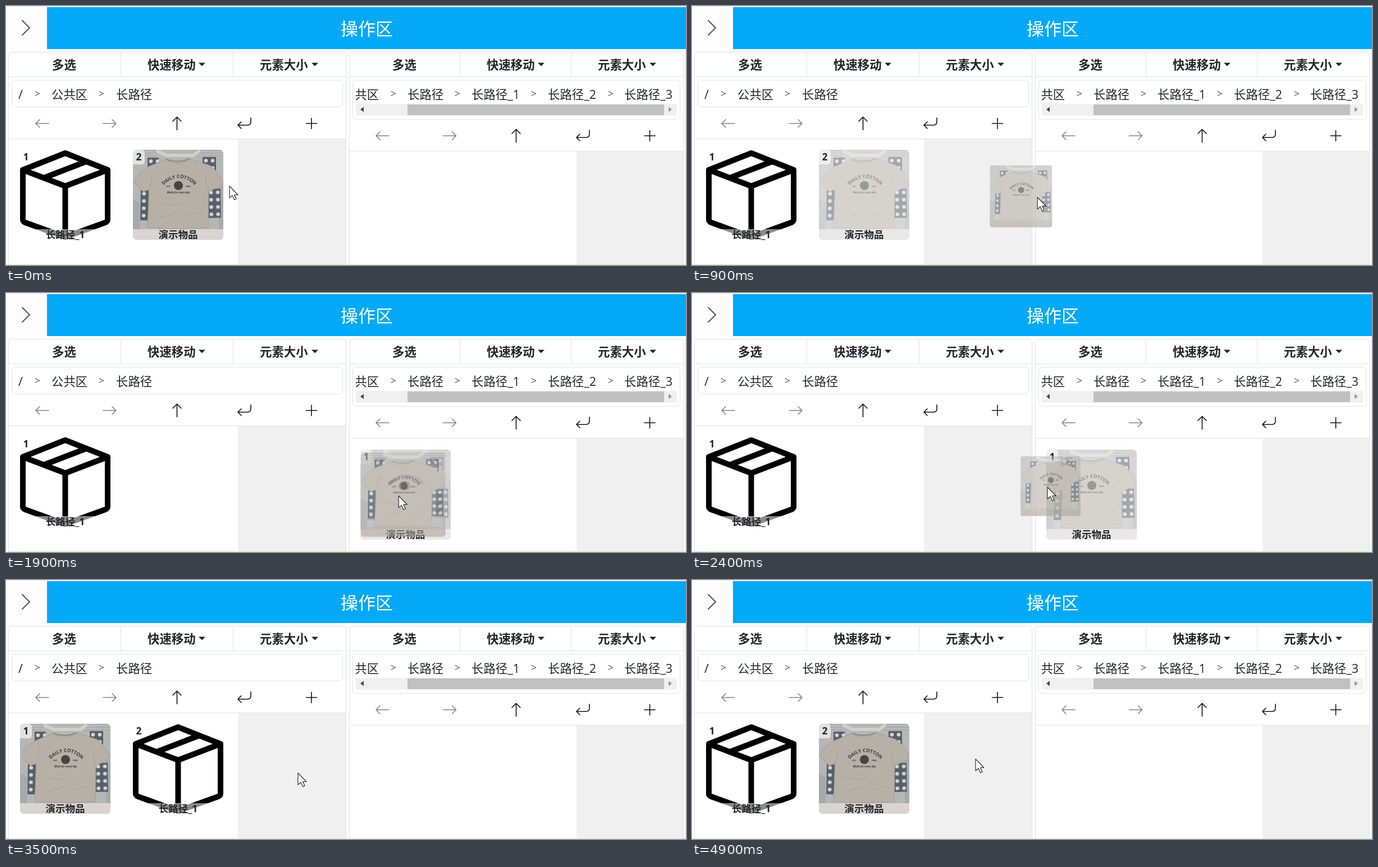
Animation, 1211 px wide and 463 px high, one loop 5000 ms. Source, as an HTML page:

```html
<!DOCTYPE html>
<html lang="zh-CN">
<head>
<meta charset="utf-8">
<title>操作区</title>
<style>
  html, body { margin: 0; width: 100%; height: 100%; overflow: hidden; background: #fdfdfd; }
  svg { display: block; width: 100%; height: 100%; }
  text { font-family: "Open Sans", "Noto Sans CJK SC", "Noto Sans CJK", sans-serif; fill: #212529; font-size: 21.4px; }
  .bold { font-weight: 700; }
  .mid { text-anchor: middle; }
  .small { font-size: 17.5px; }
  .line { fill: none; stroke: #dee2e6; }
  .icon { fill: none; stroke: #111; stroke-width: 1.6; stroke-linecap: round; stroke-linejoin: round; }
  .dim { stroke: #858585; }
  .print { fill: #3b3a3c; font-weight: 700; }
</style>
</head>
<body>
<svg viewBox="0 0 1211 463" preserveAspectRatio="none">
  <defs>
    <clipPath id="tile"><rect width="161" height="161" rx="7"/></clipPath>
    <clipPath id="crumbs"><rect x="622" y="134" width="573" height="40"/></clipPath>
    <filter id="blur" x="-20%" y="-20%" width="140%" height="140%"><feGaussianBlur stdDeviation="4"/></filter>
    <linearGradient id="glowFill">
      <stop offset=".4" stop-color="#6cd0fb"/><stop offset="1" stop-color="#6cd0fb" stop-opacity="0"/>
    </linearGradient>
    <pattern id="holes" width="12" height="13" patternUnits="userSpaceOnUse">
      <rect width="12" height="13" fill="#56606b"/><circle cx="6" cy="6.5" r="3.3" fill="#d4d6d5"/>
    </pattern>
    <pattern id="weave" width="8" height="5" patternUnits="userSpaceOnUse">
      <rect width="8" height="5" fill="#b9bab6"/><path d="M0 1H8" stroke="#999f9f"/>
    </pattern>
    <path id="arc" d="M54 64Q81 37 111 64"/>
    <g id="shirt" clip-path="url(#tile)">
      <rect width="161" height="161" fill="#b5b7b5"/>
      <path d="M0 0H42V24H0ZM110 0H161V12H110Z" fill="url(#weave)"/>
      <path d="M42 2L60 10H108L119 1" fill="none" stroke="#d0cfc9" stroke-width="6"/>
      <path d="M0 88L12 95V150H0ZM153 65H161V161H153Z" fill="#a5aaac"/>
      <rect width="20" height="24" transform="translate(26 14)" fill="url(#holes)"/>
      <rect width="24" height="26" transform="translate(124 13)" fill="url(#holes)"/>
      <rect width="14" height="54" transform="translate(14 72) rotate(1)" fill="url(#holes)"/>
      <rect width="23" height="52" transform="translate(133 70) rotate(-1)" fill="url(#holes)"/>
      <path d="M0 142H161V161H0Z" fill="#aaa397"/>
      <path d="M59 17Q80 24 101 16L137 28Q155 41 161 62L135 75L134 139Q82 144 26 139L29 71L18 75L2 57Q10 39 28 30Z" fill="#b6b0a6" stroke="#a19b91"/>
      <path d="M59 17Q80 33 101 16M30 69Q35 55 34 43M134 72Q129 58 130 46M40 92Q65 104 88 96M49 121L79 112M96 119L123 110" fill="none" stroke="#a49e94"/>
      <path d="M59 17Q80 25 101 16" fill="none" stroke="#8f8b84" stroke-width="2"/>
      <text class="print" style="font-size:8.6px"><textPath href="#arc" startOffset="50%" text-anchor="middle">DAILY COTTON</textPath></text>
      <circle cx="81" cy="64" r="8" fill="#454446"/>
      <text class="print mid" x="63" y="67" style="font-size:4px">EST</text>
      <text class="print mid" x="98" y="67" style="font-size:4px">1990</text>
      <text class="print mid" x="81" y="78" style="font-size:4.5px;font-style:italic">Made for every day</text>
    </g>
    <g id="box" fill="none" stroke="#000" stroke-width="10" stroke-linejoin="round">
      <path d="M80.5 6L156 36V125Q156 128 152 130L80.5 156L9 130Q5 128 5 125V36Z"/>
      <path d="M5 36L80.5 65L156 36M80.5 65V156M118 21L43 50"/>
    </g>
  </defs>

  <rect width="1211" height="463" fill="#fdfdfd"/>
  <path d="M0 .5H1211" stroke="#e4e4e4"/>
  <rect x="73" y="2" width="1138" height="75" fill="#03a9f6"/>
  <path d="M29 26L42 39L29 52" class="icon" style="stroke:#555;stroke-width:2"/>
  <text class="mid" x="642.5" y="52" style="font-size:31px;fill:#fff">操作区</text>
  <g id="ui"></g>
  <rect id="glow" x="-5" y="-4" width="171" height="169" rx="9" fill="url(#glowFill)" filter="url(#blur)"/>
  <g id="items"></g>
  <use id="ghost" href="#shirt" opacity=".58"/>
  <path d="M0 462.5H1211M1210.5 78V463" stroke="#c3f3b4"/>
  <path id="cursor" d="M0 0V21L5 16.7L8.8 24.5L12 23L8.5 15.5H15Z" fill="#fff" stroke="#222" stroke-width="1.1" stroke-linejoin="round"/>
</svg>
<script>
const $ = id => document.getElementById(id);
const text = (x, y, s, cls = '', style = '') => `<text x="${x}" y="${y}" class="${cls}" style="${style}">${s}</text>`;
const path = (d, cls = 'line') => `<path d="${d}" class="${cls}"/>`;

const icons = [
  ['M11.5 0H-11.5M-4.5 -7L-11.5 0L-4.5 7', 'icon dim'],
  ['M-11.5 0H11.5M4.5 -7L11.5 0L4.5 7', 'icon dim'],
  ['M0 11.5V-11.5M-7.5 -4L0 -11.5L7.5 -4', 'icon'],
  ['M11.5 -10V-3Q11.5 3 5.5 3H-11.5M-5.5 -3L-11.5 3L-5.5 9', 'icon'],
  ['M-9.5 0H9.5M0 -9.5V9.5', 'icon']
];

function panel({ x, right, tabs, labels, crumbBottom, toolY, toolXs, gridY, gray }) {
  const caret = cx => `<path d="M${cx - 6} 101.5h12l-6 6z" fill="#212529"/>`;
  return `<path d="M${x + .5} 463V88.5q0 -6 6 -6H${right - 6.5}q6 0 6 6V463" fill="#fff" stroke="#dee2e6"/>`
    + `<path d="M${gray} ${gridY + 1}H${right - 1}V463H${gray}z" fill="#f0f0f0"/>`
    + path(`M${x} 126.5H${right}M${x} ${gridY + .5}H${right}` + tabs.map(t => `M${t}.5 83V126`).join(''))
    + `<rect x="${x + 6.5}" y="132.5" width="${right - x - 13}" height="${crumbBottom - 132}" rx="6" class="line"/>`
    + text(labels[0], 113, '多选', 'bold') + text(labels[1], 113, '快速移动', 'bold') + text(labels[2], 113, '元素大小', 'bold')
    + caret(labels[1] + 97) + caret(labels[2] + 98)
    + icons.map(([d, cls], i) => `<g transform="translate(${toolXs[i]} ${toolY})">${path(d, cls)}</g>`).join('');
}

const crumb = ([x, s]) => s === '>'
  ? text(x, 163, '&gt;', 'mid', 'font-size:18px;fill:#555')
  : text(x, 166, s);

$('ui').innerHTML =
  panel({ x: 4, right: 606, tabs: [204, 404], labels: [82, 252, 452], crumbBottom: 180,
    toolY: 210, toolXs: [64.5, 184.5, 304.5, 424.5, 544], gridY: 237, gray: 413 })
  + panel({ x: 611, right: 1207, tabs: [808, 1006], labels: [688, 856, 1054], crumbBottom: 202,
    toolY: 232, toolXs: [670.5, 790, 908.5, 1027.5, 1146.5], gridY: 259, gray: 1016 })
  + [[22, '/'], [56, '>'], [81, '公共区'], [170, '>'], [196, '长路径']].map(crumb).join('')
  + '<g clip-path="url(#crumbs)">'
  + [[600, '公共区'], [690, '>'], [715, '长路径'], [804, '>'], [829, '长路径_1'], [940, '>'],
     [965, '长路径_2'], [1077, '>'], [1101, '长路径_3']].map(crumb).join('') + '</g>'
  + '<path d="M623 175H1195V196H623Z" fill="#f0f0f0"/><path d="M715 176H1172V195H715Z" fill="#c0c0c0"/>'
  + '<path d="M637 180.5v9l-6 -4.5z" fill="#444"/><path d="M1180 180.5v9l6 -4.5z" fill="#999"/>';

const item = (kind, label) => `<g id="${kind}Item"><use id="${kind}Image" href="#${kind}"/>
  <path d="M0 142H161V154q0 7 -7 7H7q-7 0 -7 -7z" fill="#fff" opacity=".55"/>
  <path d="M7 0H15q6 0 6 6V20q0 6 -6 6H0V7q0 -7 7 -7z" fill="#fff" opacity=".62"/>
  ${text(10.5, 19.3, '', 'bold mid small')}${text(80.5, 158, label, 'bold mid small')}</g>`;
$('items').innerHTML = item('box', '长路径_1') + item('shirt', '演示物品');

const left1 = [25, 257], left2 = [226, 257], right1 = [631, 280];

// Pointer path: time, x, y
const track = [
  [0, 398, 322], [300, 349, 340], [400, 360, 341], [600, 470, 330], [1100, 712, 350], [1300, 800, 338],
  [1500, 812, 345], [1800, 704, 364], [2100, 690, 360], [2400, 633, 347], [2800, 130, 348], [2900, 400, 350],
  [3000, 400, 350], [3100, 498, 348], [3500, 520, 345], [3600, 520, 345], [4100, 987, -8], [4300, 1060, -50],
  [4800, 1060, -50], [4900, 505, 320], [5000, 398, 322]
];
const drags = [{ from: 400, to: 1100, grip: [123, 83] }, { from: 1800, to: 2800, grip: [72, 83] }];

function pointerAt(t) {
  const i = track.findIndex(p => p[0] > t);
  const [a, b] = [track[i - 1], track[i]];
  const k = (t - a[0]) / (b[0] - a[0]);
  return [a[1] + (b[1] - a[1]) * k, a[2] + (b[2] - a[2]) * k];
}

const clamp = v => Math.max(0, Math.min(1, v));
const move = (el, [x, y], scale = 1) => el.setAttribute('transform', `translate(${x} ${y}) scale(${scale})`);

function place(kind, slot, opacity, imageOpacity) {
  const el = $(kind + 'Item');
  move(el, slot);
  el.setAttribute('opacity', opacity);
  $(kind + 'Image').setAttribute('opacity', imageOpacity);
  el.querySelector('text').textContent = slot === left2 ? 2 : 1;
}

function render(t) {
  const pointer = pointerAt(t);
  const drag = drags.find(d => t >= d.from && t < d.to);
  const reset = t >= 4900;
  const sorted = t >= 3100 && !reset;
  const shirtSlot = sorted ? left1 : t >= 1300 && !reset ? right1 : left2;
  const appeared = sorted ? 3100 : shirtSlot === right1 ? 1300 : -1000;
  const boxSlot = sorted ? left2 : left1;

  place('box', boxSlot, 1, 1);
  place('shirt', shirtSlot, clamp(.15 + (t - appeared) / 400), drag ? .55 : 1);

  move($('glow'), boxSlot);
  $('glow').setAttribute('opacity', t < 2700 || reset ? 0 : clamp((3400 - t) / 400));

  $('ghost').style.display = drag ? '' : 'none';
  if (drag) {
    const scale = Math.max(.665, 1 - (t - drag.from) * .00062);
    move($('ghost'), pointer.map((v, i) => v - drag.grip[i] * scale), scale);
  }
  move($('cursor'), pointer);
}

const start = performance.now();
function frame() {
  const t = (performance.now() - start) % 5000;
  render(Math.floor(t / 100) * 100);
  requestAnimationFrame(frame);
}
frame();
</script>
</body>
</html>
```
